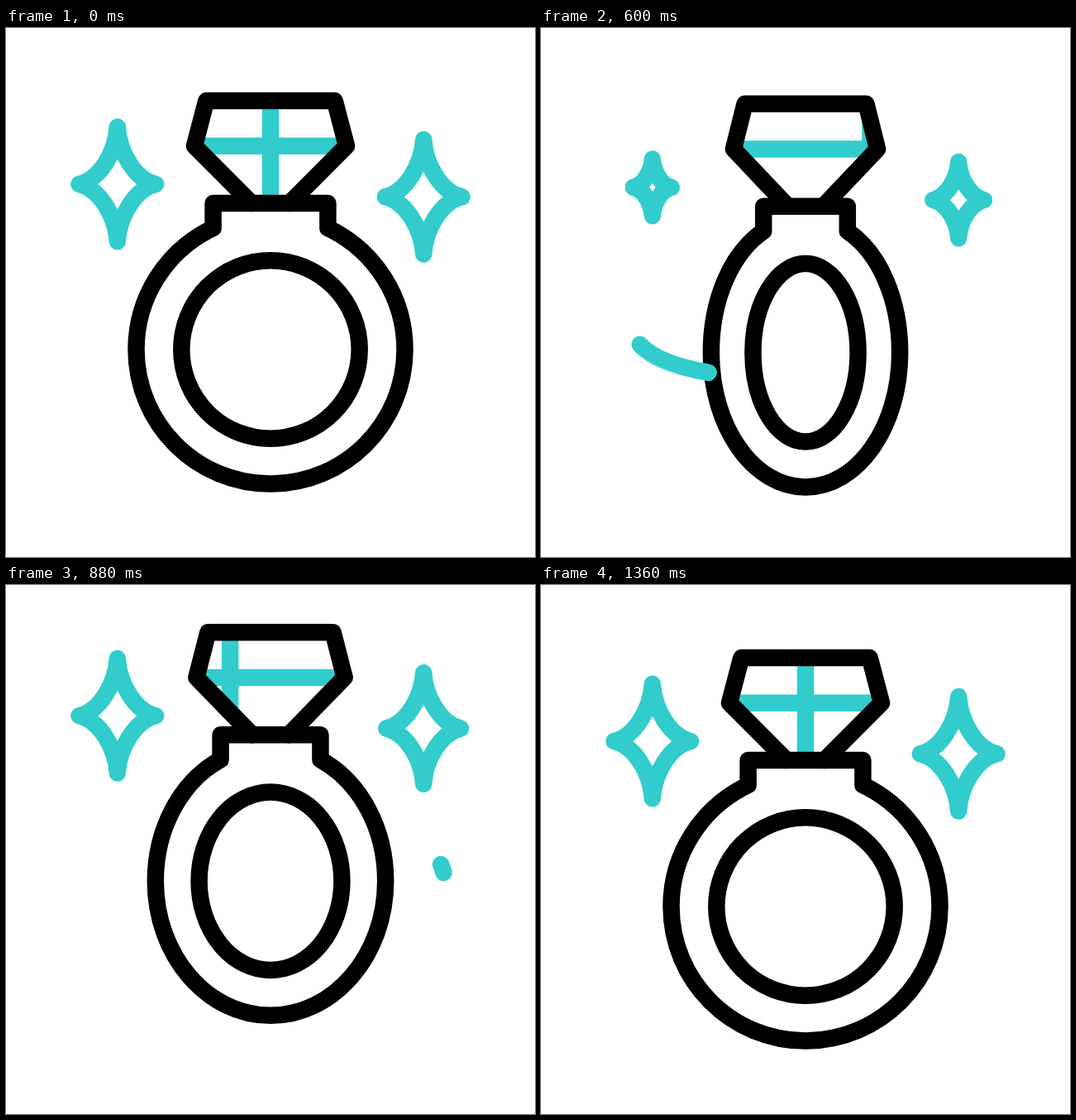
Animation of 640 by 640 pixels, one loop 1.8 s. Source, as an HTML page:

```html
<!DOCTYPE html>
<html lang="en">
<head>
<meta charset="utf-8">
<title>Sparkling ring</title>
<style>
  html, body { margin: 0; width: 100%; height: 100%; overflow: hidden; background: #fff; }
  svg { display: block; width: 100vw; height: 100vh; }
  path, ellipse { fill: none; stroke: #000; stroke-width: 20.5; stroke-linecap: round; stroke-linejoin: round; }
  .teal { stroke: #33cccc; }
</style>
</head>
<body>
<svg viewBox="0 0 640 640">
  <clipPath id="facet"><path id="facetShape"/></clipPath>
  <g id="scene">
    <g clip-path="url(#facet)">
      <path class="teal" d="M220 142.7H420"/>
      <path class="teal" id="glint" d="M320 80V220"/>
    </g>
    <path id="gem"/>
    <path id="band"/>
    <ellipse id="hole" cx="320" cy="389" ry="107.7"/>
    <path class="teal" id="starLeft"/>
    <path class="teal" id="starRight"/>
  </g>
  <path class="teal" id="swoosh" pathLength="1" d="M114 338C87 398 180 425.5 320 425.5S553 398 526 338"/>
</svg>
<script>
const LOOP = 1800, STEP = 40;
const $ = id => document.getElementById(id);
const set = (id, name, value) => $(id).setAttribute(name, value);
const progress = (t, from, to) => Math.min(1, Math.max(0, (t - from) / (to - from)));
const smooth = u => u * u * (3 - 2 * u);

// Symmetric cubic-bezier(a, 0, 1 - a, 1)
function ease(u, a) {
  let lo = 0, hi = 1;
  for (let i = 0; i < 24; i++) {
    const s = (lo + hi) / 2, r = 1 - s;
    if (3 * a * s * r * r + 3 * (1 - a) * s * s * r + s ** 3 < u) lo = s; else hi = s;
  }
  return smooth((lo + hi) / 2);
}

// Dip, leap, then settle back down
const bounce = t =>
  4.4 * smooth(progress(t, 145, 568))
  - 35.2 * ease(progress(t, 568, 870), 0.5)
  + 30.8 * ease(progress(t, 873, 1356), 0.6);

// 0 when facing front, 1 when edge-on
const turn = t => t < 700 ? progress(t, 200, 700) ** 4 : (1 - progress(t, 700, 1240)) ** 4;

const twinkle = (t, middle, half) =>
  1 - 0.55 * smooth(1 - Math.min(1, Math.abs(t - middle) / half));

function star(cx, cy, k) {
  const at = (x, y) => `${cx + x * k} ${cy + y * k} `;
  const arm = (sx, sy) => [[2, 39], [21, 6], [46.3, 0]].map(([x, y]) => at(sx * x, sy * y));
  const back = (sx, sy) => [[21, 6], [2, 39], [0, 69.3]].map(([x, y]) => at(sx * x, sy * y));
  return `M${at(0, -69.3)}C${[...arm(1, -1), ...back(1, 1), ...arm(-1, 1), ...back(-1, -1)].join("")}Z`;
}

function gemPath(p) {
  const top = 77.7 - 10.4 * p, side = 92 - 12 * p, base = 23 - 4 * p;
  return `M${320 - base} 212L${320 - side} 142.7L${320 - top} 88H${320 + top}L${320 + side} 142.7L${320 + base} 212`;
}

function bandPath(p) {
  const collar = 69.4 - 45.4 * p, r = 162.5 - 118 * p, f = r / 162.5;
  const half = s => {
    const x = d => 320 + s * d;
    return `M320 212H${x(collar)}V242C${x(collar + 56.8 * f)} 269 ${x(r)} 326.2 ${x(r)} 389` +
      `C${x(r)} 478.7 ${x(r * 0.552)} 551.6 320 551.6`;
  };
  return half(-1) + half(1);
}

function draw(t) {
  const p = turn(t), gem = gemPath(p);
  const slide = p ** 1.145 * (t < 700 ? 218 : -313);
  set("scene", "transform", `translate(0 ${bounce(t)})`);
  set("glint", "transform", `translate(${slide} 0)`);
  set("gem", "d", gem);
  set("facetShape", "d", gem + "Z");
  set("band", "d", bandPath(p));
  set("hole", "rx", 107.7 * (1 - p));
  set("starLeft", "d", star(134.8, 189, twinkle(t, 560, 225)));
  set("starRight", "d", star(505.2, 204.3, twinkle(t, 693, 218)));

  const head = smooth(progress(t, 470, 850)), tail = smooth(progress(t, 527, 913));
  set("swoosh", "visibility", head > tail ? "visible" : "hidden");
  set("swoosh", "stroke-dasharray", `${head - tail} 2`);
  set("swoosh", "stroke-dashoffset", -tail);
}

function tick() {
  const t = performance.now() % LOOP;
  draw(Math.floor(t / STEP) * STEP);
  requestAnimationFrame(tick);
}
tick();
</script>
</body>
</html>
```
